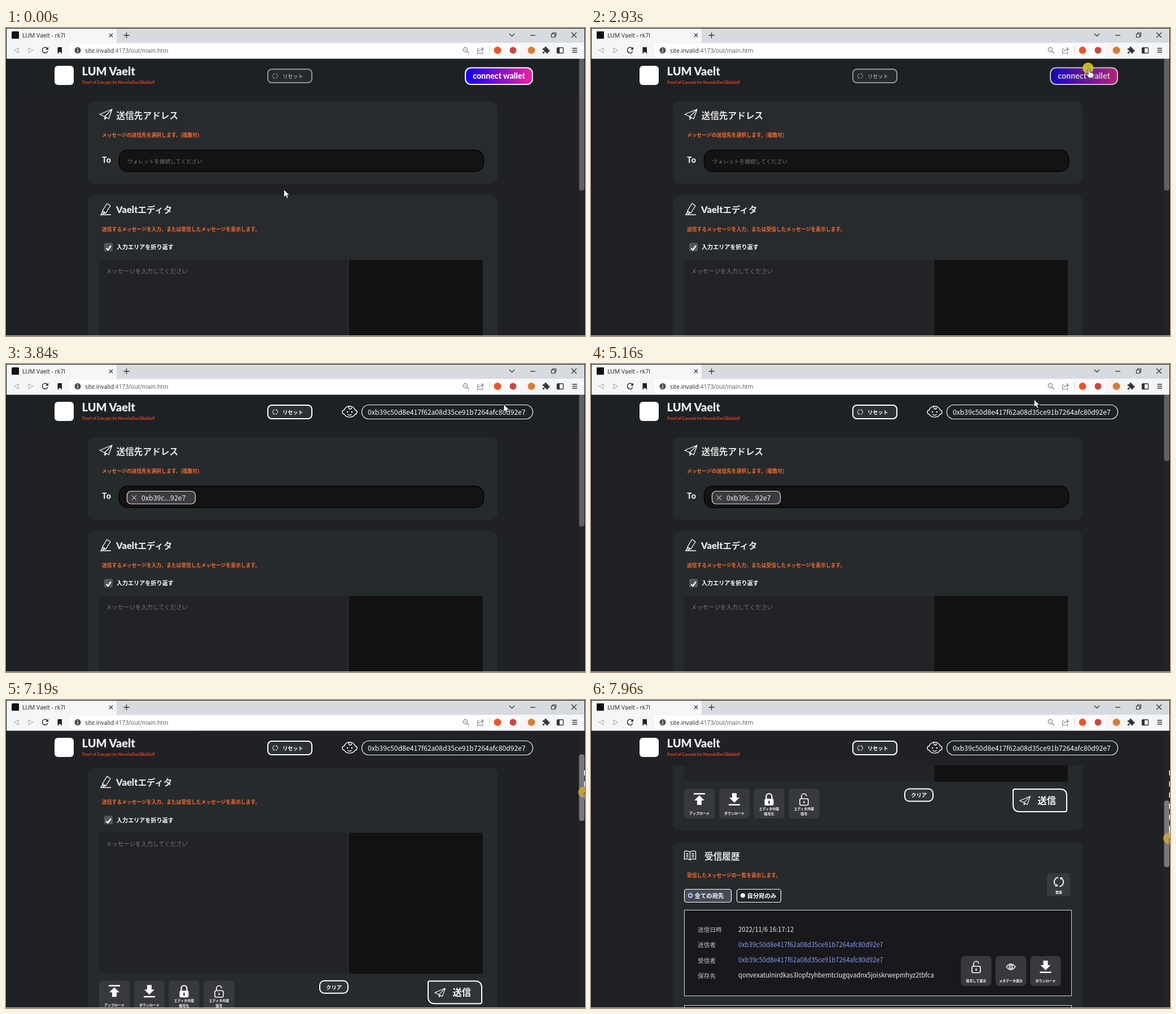
Animation, 1026 px wide and 546 px high, one loop 8 s. Source, as an HTML page:

```html
<!DOCTYPE html>
<html lang="ja">
<head>
<meta charset="utf-8">
<style>
html, body { margin: 0; width: 100%; height: 100%; overflow: hidden; background: #202125 }
svg { display: block; width: 1026px; height: 546px; font-family: "Noto Sans CJK JP", "Noto Sans", sans-serif }
</style>
</head>
<body>
<script>
const LOOP = 8000, CONNECTED = 3560, LISTED = 4100, PRESS = 6750;
const WALLET = '0xb39c50d8e417f62a08d35ce91b7264afc80d92e7';
const ORANGE = '#ff6a2b', TILE = '#38393e';
const LATO = 'Lato, sans-serif', OPEN = '"Open Sans", sans-serif';

const text = (x, y, size, str, fill = '#fff', weight = 700, extra = '') =>
  `<text x="${x}" y="${y}" font-size="${size}" fill="${fill}" font-weight="${weight}" ${extra}>${str}</text>`;
const font = f => ` font-family='${f}'`;
const rect = (x, y, w, h, r, fill, extra = '') =>
  `<rect x="${x}" y="${y}" width="${w}" height="${h}" rx="${r}" fill="${fill}" ${extra}/>`;
const circle = (x, y, r, fill, extra = '') => `<circle cx="${x}" cy="${y}" r="${r}" fill="${fill}" ${extra}/>`;
const line = (d, color = '#fff', width = 1.3, extra = '') =>
  `<path d="${d}" fill="none" stroke="${color}" stroke-width="${width}" stroke-linejoin="round" ${extra}/>`;
const solid = (d, fill = '#fff', extra = '') => `<path d="${d}" fill="${fill}" ${extra}/>`;
const at = (x, y, body, scale = 1) => `<g transform="translate(${x} ${y}) scale(${scale})">${body}</g>`;
const stroke = (color, width = 1) => `stroke="${color}" stroke-width="${width}"`;
const MIDDLE = 'text-anchor="middle"';

// Icons, most of them centred on 0,0
const plane = line('M-11 0L11-9L5 8L-2 4ZM11-9L-2 4V9L1 5.5');
const refresh = [0, 180].map(a => `<g transform="rotate(${a})">` +
  line('M-1-8A8 8 0 0 0-5 6.3', '#fff', 1.8) + solid('M-1.5 7.5L-7 8.5L-3.4 3.5Z') + '</g>').join('');
const upload = solid('M-10-11H10V-8.5H-10ZM0-7L9 2H4V10H-4V2H-9Z');
const download = solid('M-4-11H4V-3H9L0 6L-9-3H-4ZM-10 8.5H10V11H-10Z');
const lock = rect(-8, -1, 16, 12, 2.5, '#fff') + line('M-5 0V-5A5 5 0 0 1 5-5V0', '#fff', 2.2) +
  solid('M-1.5 4A1.5 1.5 0 1 1 1.5 4L1 8H-1Z', TILE);
const unlock = rect(-7.5, -1, 15, 11.5, 2.5, 'none', stroke('#fff', 1.6)) +
  line('M-4.5-1V-5A4.5 4.5 0 0 1 4.5-5.5', '#fff', 1.6) + line('M0 3V7', '#fff', 1.8);
const eye = line('M-8 0Q0-10 8 0Q0 10-8 0Z') + circle(0, 0, 3, 'none', stroke('#fff', 1.4)) + circle(0, 0, 1, '#fff');
const book = line('M0-6Q-5-9-10-7V7Q-5 5 0 8Q5 5 10 7V-7Q5-9 0-6V8M-7-3.5L-3-3M-7-.5L-3 0M-7 2.5L-3 3M7-3.5L3-3M7-.5L3 0M7 2.5L3 3');
const marker = line('M-9 10H10M-5 3L3-10L9-6L1 7L-5 7ZM-5 3L1 7M-5 5L-8 10H-4L-2 7');
const baby = line('M-10-3A10.5 10.5 0 0 1 10-3Q13-3 13 0Q13 4 9.5 4A10.5 9 0 0 1-9.5 4Q-13 4-13 0Q-13-3-10-3ZM-1-10Q-3-6 1-5Q5-6 2-8', '#fff', 1.4) +
  circle(-4, 0, 1.3, '#fff') + circle(4, 0, 1.3, '#fff') + line('M-3.5 4Q0 7.5 3.5 4');

const tile = (x, y, icon, ...labels) => rect(x, y, 54, 53, 6, TILE) + at(x + 27, y + 19, icon) +
  labels.map((s, i) => text(x + 27, y + (labels.length > 1 ? 38 + i * 8.5 : 46), 6, s, '#fff', 900, MIDDLE)).join('');

function browserBar() {
  const dark = '#333', pale = '#b4b5b8';
  return rect(0, 0, 1026, 27, 0, '#d7dade') + rect(1, 1, 195, 27, 4, '#f5f6f8') + rect(0, 26, 1026, 28.5, 0, '#f5f6f8') +
    rect(113, 28, 798, 23, 4, '#fff') + rect(10, 6, 13, 13, 1, '#111') +
    text(29, 17, 10.4, 'LUM Vaelt - rk7l', '#222', 400, font(OPEN)) +
    line('M183 10L189 16M189 10L183 16', dark) + line('M213.5 8V18M208.5 13H218.5', dark) +
    line('M892 10L896.5 14.5L901 10', dark) + line('M929 13H938', dark) +
    line('M966.5 10.5H972.5V16.5H966.5ZM968.5 10V8.5H974.5V14.5H973', dark, 1.2) +
    line('M1002 8L1011 17M1011 8L1002 17', dark) +
    line('M22 35V44L14.5 39.5ZM40 35V44L47.5 39.5Z', pale, 1.2) +
    line('M73.5 36.5A5 5 0 1 0 74 41', dark, 1.6) + solid('M75 33.5V38.5H70Z', dark) +
    solid('M91.5 34H99V45.5L95.25 42L91.5 45.5Z', '#222') +
    circle(127, 39.5, 5.5, '#4a4d52') + solid('M126.3 36H127.7V37.4H126.3ZM126.3 38.5H127.7V43H126.3Z') +
    text(140, 43.5, 10.3, 'site.invalid<tspan fill="#555">:4173/out/main.htm</tspan>', '#222', 400, font(OPEN)) +
    circle(814, 38.5, 3.8, 'none', stroke('#777', 1.2)) + line('M817 41.5L820.5 45M812.5 38.5H815.5', '#777', 1.2) +
    line('M838 37H835.5V45H844.5V42M838 42Q839 37.5 845.5 37.5M843 34.5L846 37.5L843 40.5', '#777', 1.1) +
    rect(856, 32, 1, 14, 0, '#ccc') + circle(871, 39.5, 6.5, '#f2562b') + circle(898.5, 39.5, 6, '#d4433c') +
    circle(931, 39.5, 6.5, '#df7a2c') +
    solid('M951 36H954.5A2 2 0 1 1 958 36H960.5V38.5A2 2 0 1 1 960.5 42V45H957A1.8 1.8 0 1 0 954 45H951V42A1.8 1.8 0 1 0 951 39Z', dark) +
    rect(976.5, 35, 11, 9.5, 1, 'none', stroke(dark, 1.3)) + rect(977, 35, 4, 9.5, 0, dark) +
    line('M1003.5 36H1012M1003.5 39.5H1012M1003.5 43H1012', dark, 1.5);
}

function header() {
  const address = rect(630.5, 72.5, 303, 25, 12.5, '#1d2123', stroke('#fff', 1.2)) +
    text(641, 90, 12.2, WALLET, '#fff', 500) + at(609, 85, baby);
  return rect(1, 54.5, 1014, 61.5, 0, '#1d2123', 'id="band"') + rect(86, 67, 34, 34, 6, '#fff') +
    text(134.5, 84, 19.9, 'LUM Vaelt', '#e8e8e8', 900, font(LATO)) +
    text(135, 98.5, 6.85, 'Proof of Concept for NorveluDev5Buildoff', '#e8442e', 700, font(LATO)) +
    `<g id="reset">${rect(464, 73, 78, 24, 7, '#2d3133', stroke('#fff', 2))}${at(477, 85, refresh, .55)}${text(490, 88.5, 9.2, 'リセット', '#fff', 900)}</g>` +
    `<g id="connect">${rect(814, 70.5, 119, 29.5, 10, 'url(#grad)', stroke('#fff', 2))}${text(873.5, 89.5, 14.2, 'connect wallet', '#fff', 800, MIDDLE + font(LATO))}</g>` +
    `<g id="address">${address}</g>`;
}

function cardsTop() {
  const chip = rect(214.5, 225.5, 121, 22.5, 7, '#3a3b3e', stroke('#e4e4e4', 1.2)) +
    line('M223 233L231 241M231 233L223 241', '#aaa') + text(240, 242, 12.4, '0xb39c...92e7', '#eee', 500);
  return rect(145, 130, 726, 146, 13, '#282b2e', 'class="card"') + at(177, 153, plane) +
    text(195.5, 161, 15.7, '送信先アドレス', '#e4e4e4') +
    text(170, 192.5, 8.8, 'メッセージの送信先を選択します。(複数可)', ORANGE) +
    text(170, 239, 14, 'To', '#f0f0f0') + rect(200.5, 216.5, 646, 38, 15, '#131314', stroke('#000', 1.3)) +
    `<g id="hint">${text(215, 240, 9.55, 'ウォレットを接続してください', '#76777a', 400)}</g><g id="chip">${chip}</g>` +
    rect(145, 296, 726, 451, 13, '#282b2e', 'class="card"') + at(176, 321, marker) +
    text(195, 328, 15.5, `<tspan ${font(LATO)} font-weight="900" font-size="16.5">Vaelt</tspan>エディタ`, '#e4e4e4') +
    text(170, 359.5, 8.8, '送信するメッセージを入力、または受信したメッセージを表示します。', ORANGE) +
    rect(174, 381, 15, 15, 2.5, '#555659') + line('M177.5 390.5L180.5 393.5L186 386', '#fff', 2.2) +
    text(196, 392.3, 10.1, '入力エリアを折り返す') +
    rect(165, 411, 440, 250, 0, '#222327') + rect(607.5, 411, 237.5, 250, 0, '#121213') +
    text(177, 434.5, 10.45, 'メッセージを入力してください', '#77787b', 400);
}

function cardsBottom() {
  const rows = [['送信日時', '2022/11/6 16:17:12', '#f0f0f0'], ['送信者', WALLET, '#8c9cf0'], ['受信者', WALLET, '#8c9cf0'],
    ['保存先', 'qonvexatulnirdkas3lopfzyhbemtclugqvadnx5joiskrwepmhyz2tbfca', '#f0f0f0']];
  const pill = (x, w, fill, label, dot) => rect(x + .5, 432.5, w, 23, 4, fill, stroke('#fff', 1.2)) +
    circle(x + 11, 443.5, 4, '#fff') + (dot ? circle(x + 11, 443.5, 2.8, '#1a6be0') : '') + text(x + 18.5, 448, 10.4, label);
  return tile(165, 254, upload, 'アップロード') + tile(227, 254, download, 'ダウンロード') +
    tile(288.5, 254, lock, 'エディタ内容', '暗号化') + tile(350.5, 254, unlock, 'エディタ内容', '復号') +
    rect(556, 254.5, 50, 22, 8, '#303437', stroke('#fff', 2)) + text(567, 269.3, 9.4, 'クリア', '#fff', 900) +
    solid('M751 255H831Q843 255 843 267V292Q843 295 840 295H760Q748 295 748 283V258Q748 255 751 255Z', '#303437', stroke('#fff', 2)) +
    at(769, 275.5, plane, .85) + text(791.5, 281, 16.2, '送信') +
    rect(145, 349, 726, 1300, 13, '#252b2d') + at(175.5, 372.5, book) + text(201, 380, 15.7, '受信履歴', '#e4e4e4') +
    text(170, 411.3, 8.8, '受信したメッセージの一覧を表示します。', ORANGE) +
    rect(808, 404, 41, 41, 5, TILE) + at(829, 419.5, refresh) + text(829, 440, 6.2, '更新', '#fff', 900, MIDDLE) +
    pill(165, 83, '#474b58', '全ての宛先', true) + pill(258, 78, '#222629', '自分宛のみ') +
    rect(165.5, 469.5, 686, 152, 0, '#19181c', stroke('#d8d8e8')) + rect(165.5, 638.5, 686, 152, 0, '#19181c', stroke('#d8d8e8')) +
    rows.map(([label, value, color], i) => text(189, 508 + i * 27.3, 10.7, label, '#c4c4c6', 500) +
      text(261, 507.5 + i * 27.3, 11.2, value, color, 500)).join('') +
    tile(655.5, 551, unlock, '復号して表示') + tile(717, 551, eye, 'メタデータ表示') + tile(778.5, 551, download, 'ダウンロード');
}

document.body.innerHTML = `<svg viewBox="0 0 1026 546">
<defs><linearGradient id="grad"><stop offset=".08" stop-color="#1c00f2"/><stop offset="1" stop-color="#f3219f"/></linearGradient></defs>
${rect(0, 0, 1026, 546, 0, '#202125')}
<g id="page">${cardsTop()}<g transform="translate(0 419)">${cardsBottom()}</g></g>
${header()}${rect(1015, 54.5, 11, 491, 0, '#232428')}${rect(1015.5, 54, 9.5, 234, 4, '#606163', 'id="thumb"')}
${browserBar()}
<path d="M0 .5H1026M.5 0V546M1025.5 0V546" stroke="#151515" fill="none"/>
${rect(0, 545, 1026, 1, 0, '#c8c8c8')}
<path id="trail" stroke="#fff" stroke-width="1.5"/>
<g id="pointer">${circle(-1.2, -.5, 9.8, '#d2c11c', 'id="press" opacity=".92"')}
${solid('M0 0V13.5L3.2 10.6L5.4 15.3L7.7 14.3L5.6 9.7H9.8Z', '#fff', 'id="arrow" stroke="#111" stroke-width=".8"')}
${solid('M-1 1Q.5-1 2 1V7L7 8Q9 8.5 8.5 11L7.5 17H0L-4 11Q-5 8.5-3 9L-1 11Z', '#fff', 'id="hand" stroke="#111" stroke-width=".9"')}</g>
</svg>`;

const $ = id => document.getElementById(id);
const cards = document.querySelectorAll('.card');
const show = (id, on) => $(id).setAttribute('visibility', on ? 'visible' : 'hidden');
const set = (id, attrs) => { for (const k in attrs) $(id).setAttribute(k, attrs[k]); };

// Keys are [time, ...values]
function track(keys, t, ease = p => p) {
  const i = keys.findIndex(k => k[0] > t);
  if (i < 0) return keys.at(-1).slice(1);
  if (!i) return keys[0].slice(1);
  const a = keys[i - 1], b = keys[i], p = ease((t - a[0]) / (b[0] - a[0]));
  return a.slice(1).map((v, j) => v + (b[j + 1] - v) * p);
}
const smooth = p => p * p * (3 - 2 * p);

const pointerKeys = [[220, 492.5, 286.5], [800, 900, 112], [1030, 926, 106], [1310, 855, 102], [1580, 880, 36],
  [1880, 918, 128], [2250, 858, 110], [2720, 882, 71.5], [4000, 882, 71.5], [4450, 760, 112], [4850, 650, 92],
  [5200, 790, 62], [5450, 895, 132], [5680, 931, 118], [6450, 1017.5, 121.5], [6550, 1017.5, 121.5], [6840, 1025, 121.5]];
const scrollKeys = [[7040, 0], [7400, 419], [7540, 470], [7680, 495], [7820, 510], [7960, 516]];
const scrollAt = t => track(scrollKeys, t)[0];
const thumbShift = t => scrollAt(t) / 4.155;

function render(t) {
  const scroll = scrollAt(t), shift = thumbShift(t), on = t >= CONNECTED, dragging = t >= PRESS;
  let [x, y] = track(pointerKeys, t, smooth);
  const hover = !on && x > 813 && x < 934 && y > 69 && y < 101;
  y += shift;

  set('page', { transform: `translate(0 ${-scroll})` });
  set('band', { fill: scroll > 20 ? '#202124' : '#1d2123' });
  cards.forEach(c => c.setAttribute('fill', on ? '#252b2d' : '#282b2e'));
  set('reset', { opacity: on ? 1 : .52 });
  set('connect', { opacity: hover ? .72 : 1 });
  show('connect', !on); show('address', on);
  show('hint', !on); show('chip', on);
  set('thumb', { y: 54 + shift, height: t < LISTED ? 234 : 118, fill: dragging ? '#77787a' : '#606163' });

  let trail = '';
  for (let k = 7050; k <= t; k += 70) trail += `M1025.3 ${122 + thumbShift(k)}v9`;
  set('trail', { d: trail || 'M0 0' });

  set('pointer', { transform: `translate(${x} ${y})` });
  set('press', { fill: dragging ? '#c9a43a' : '#d2c11c' });
  show('press', dragging || t >= 2860 && t < 3080);
  show('arrow', !hover); show('hand', hover);
}

function tick() {
  render(performance.now() % LOOP);
  requestAnimationFrame(tick);
}
tick();
</script>
</body>
</html>
```
